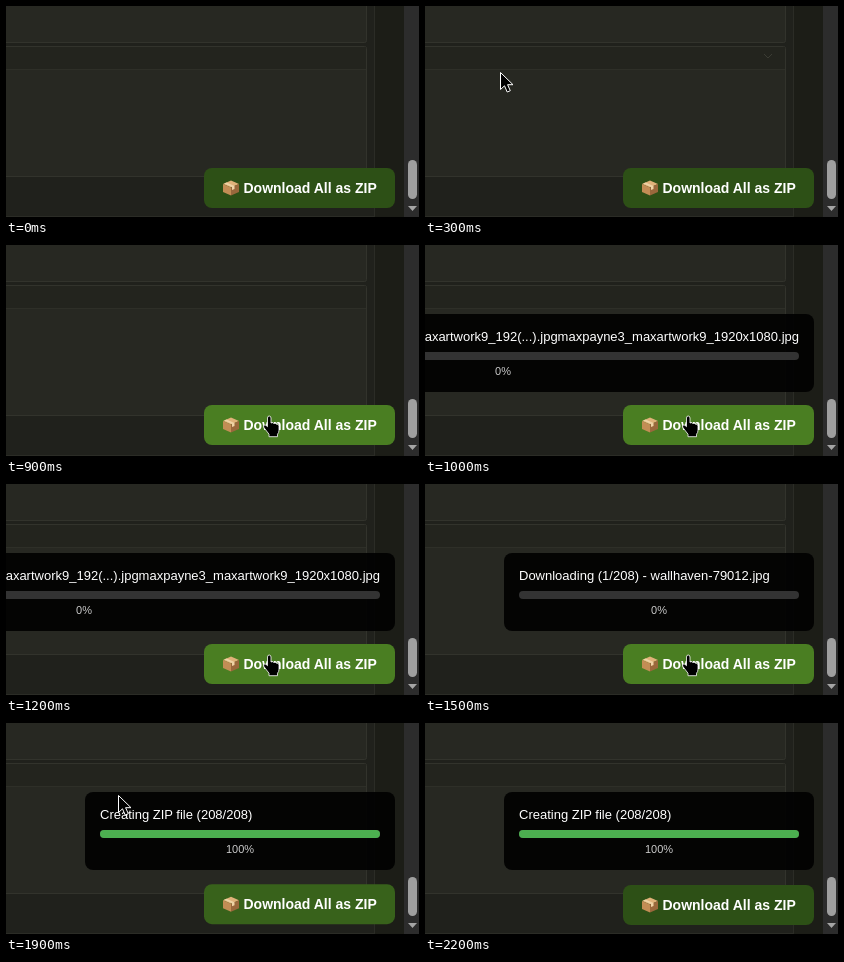
Recreate the animation shown at these times as an HTML page. Size 413 by 211 pixels, loop 3 s.

```html
<!DOCTYPE html>
<html lang="en">
<head>
<meta charset="utf-8">
<title>Download progress</title>
<style>
  html, body { margin: 0; width: 100%; height: 100%; overflow: hidden; background: #1e1f1a; }
  svg { display: block; width: 413px; height: 211px; }
  text { font-family: "Liberation Sans", Arial, sans-serif; fill: #fff; white-space: pre; }
</style>
</head>
<body>
<svg viewBox="0 0 413 211">
  <!-- page -->
  <rect width="413" height="211" fill="#1e1f1a"/>
  <rect x="-9" y="-9" width="377.5" height="219.5" fill="#20211c" stroke="#2b2c26"/>
  <g fill="#272822" stroke="#32332c">
    <rect x="-9.5" y="-9.5" width="370" height="46" rx="2"/>
    <rect x="-9.5" y="40.5" width="370" height="130" rx="2"/>
  </g>
  <rect y="41" width="360" height="22" fill="#23241e"/>
  <rect y="63" width="360" height="1" fill="#2e2f28"/>
  <path id="chevron" d="M339 48l4 4 4-4" fill="none" stroke="#75766b"/>
  <rect x="369" width="29" height="211" fill="#1c1d17"/>
  <rect x="398" width="15" height="211" fill="#2c2c2c"/>
  <rect x="402" y="154" width="9" height="39" rx="4.5" fill="#9f9f9f"/>
  <path d="M402 200h9l-4.5 5z" fill="#a5a5a5"/>

  <g id="popup">
    <rect id="card" y="69" height="78" rx="8" fill="#000" fill-opacity=".9"/>
    <text id="label" y="96" font-size="13"></text>
    <rect id="track" y="107" height="8" rx="4" fill="#333"/>
    <rect id="bar" x="94" y="107" height="8" rx="4" fill="#4caf50"/>
    <text id="percent" y="130" font-size="11" text-anchor="middle" style="fill:#ccc"></text>
  </g>

  <g id="button">
    <rect id="face" x="198" y="162" width="191" height="40" rx="8"/>
    <g>
      <path d="M217 178l8-3.500 8 3.500-8 3.500z" fill="#e0b27a"/>
      <path d="M217 178l8 3.500v8l-8-3.500z" fill="#c38d55"/>
      <path d="M233 178l-8 3.500v8l8-3.500z" fill="#9a683c"/>
      <path d="M220.500 176.500l8 3.500v3l-2.500 1v-3l-8-3.500z" fill="#efd3a5"/>
    </g>
    <text x="237.500" y="187" font-size="14" font-weight="bold">Download All as ZIP</text>
  </g>

  <g id="cursor" fill="#000" stroke="#fff" stroke-linejoin="round">
    <path id="arrow" d="M.5 .5v17l4-3.700 2.700 6.200 3.100-1.300-2.700-6h5.400z"/>
    <path id="hand" d="M-1.500 1q0-2 1.700-2t1.800 2v5q1.500-1 2.800.5 1.500-.8 2.700.7 2.500-.5 2.500 2v4q0 2.500-1.500 4v2.500h-8.500v-2.500l-5-6.500q-1.200-2 .5-2.700 1.300-.4 3 1.700z" stroke-width=".8"/>
  </g>
</svg>
<script>
const el = id => document.getElementById(id);
const set = (id, attrs) => {
  for (const key in attrs) el(id).setAttribute(key, attrs[key]);
};
const show = (id, on) => { el(id).style.display = on ? "" : "none"; };
const clamp = x => Math.min(1, Math.max(0, x));

// CSS "ease": cubic-bezier(.25, .1, .25, 1)
function ease(x) {
  x = clamp(x);
  const curve = (a, b, s) => 3 * a * s * (1 - s) ** 2 + 3 * b * s * s * (1 - s) + s ** 3;
  let lo = 0, hi = 1;
  for (let i = 0; i < 20; i++) {
    const mid = (lo + hi) / 2;
    if (curve(.25, .25, mid) < x) lo = mid; else hi = mid;
  }
  return curve(.1, 1, lo);
}

// Linear interpolation through [time, ...values] points
function along(points, t) {
  const i = points.findIndex(p => p[0] > t);
  if (i < 0) return points[points.length - 1].slice(1);
  if (i === 0) return points[0].slice(1);
  const [a, b] = [points[i - 1], points[i]];
  const k = (t - a[0]) / (b[0] - a[0]);
  return a.slice(1).map((v, j) => v + (b[j + 1] - v) * k);
}

const path = [
  [200, 0, 26], [300, 75, 66], [400, 155, 112], [500, 225, 150], [600, 263, 172],
  [1600, 263, 172], [1700, 243, 165], [1800, 180, 128], [1900, 112, 72], [2000, 41, 1]
];
const chevronFade = [[200, 0], [300, .3], [400, .8], [500, .8], [600, .25], [700, 0]];
const dark = [45, 80, 22], lit = [74, 126, 34];

const longName = "Downloading (0/208) - maxpayne3_maxartwork9_192(...).jpgmaxpayne3_maxartwork9_1920x1080.jpg";
const shortName = "Downloading (1/208) - wallhaven-79012.jpg";

function drawButton(t) {
  const hover = ease((t - 550) / 300) - ease((t - 1795) / 300);
  const color = dark.map((c, i) => Math.round(c + (lit[i] - c) * hover));
  set("face", { fill: `rgb(${color})` });
  set("button", { transform: `translate(0 ${-2 * hover})` });
}

function drawPopup(t) {
  const open = t >= 1000 || t < 200 && false;
  show("popup", open);
  if (!open) return;
  const wide = t < 1300, zipping = t >= 1600;
  const left = wide ? -233 : 79;
  set("card", { x: left, width: 389 - left });
  set("track", { x: left + 15, width: 359 - left });
  set("bar", { width: 280 * ease((t - 1575) / 300) });
  set("label", { x: wide ? 374 : 94, "text-anchor": wide ? "end" : "start" });
  set("percent", { x: (left + 389) / 2 });
  el("label").textContent = zipping ? "Creating ZIP file (208/208)" : wide ? longName : shortName;
  el("percent").textContent = zipping ? "100%" : "0%";
}

function drawCursor(t) {
  const [x, y] = along(path, t);
  const onButton = x > 198 && y > 160;
  show("cursor", t >= 200 && t < 2100);
  show("hand", onButton);
  show("arrow", !onButton);
  set("cursor", { transform: `translate(${x} ${y})` });
}

function frame() {
  // The picture advances in steps of 100 ms
  const t = Math.floor(performance.now() % 3000 / 100) * 100;
  set("chevron", { opacity: along(chevronFade, t)[0] });
  drawButton(t);
  drawPopup(t);
  drawCursor(t);
  requestAnimationFrame(frame);
}
frame();
</script>
</body>
</html>
```
